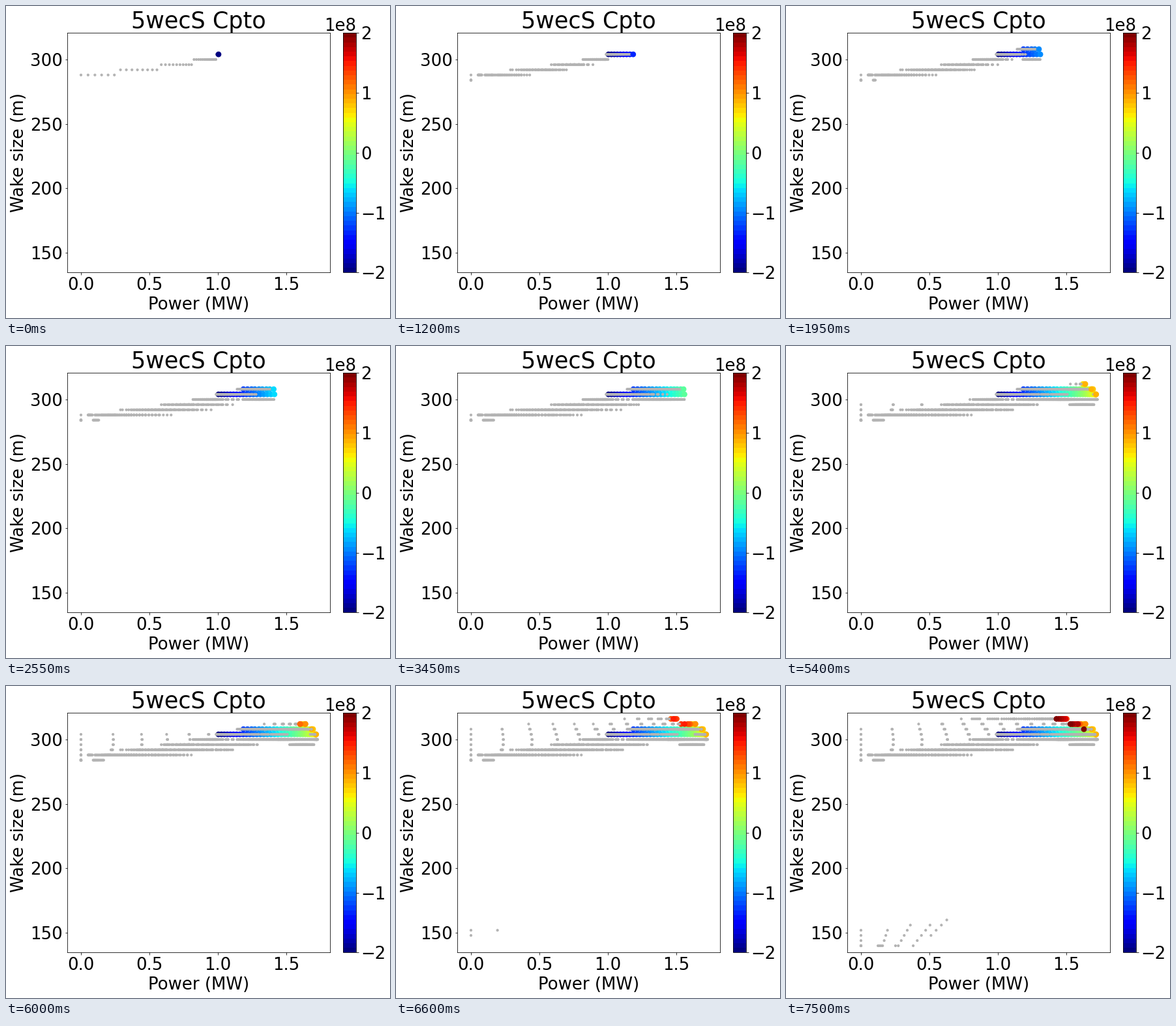
Recreate the animation shown at these times as a matplotlib script. Size 589 px wide and 478 px high, loop 7650 ms.

```python
import numpy as np
import matplotlib.pyplot as plt
from matplotlib.animation import FuncAnimation
from matplotlib.cm import ScalarMappable
from matplotlib.colors import Normalize

W, H, DPI = 589, 478, 72
STEPS, INTERVAL = 51, 150
GRAY = (0.7, 0.7, 0.7, 1)
JET = plt.get_cmap("jet", STEPS)
DAMPING = np.arange(STEPS)
RESONANCE, COLLAPSE = 36, 43
plt.rcParams["font.family"] = "DejaVu Sans"


def absorbed_power(k):
    """Spring-damper absorber: stiffness k cancels the reactance near resonance."""
    resistance = 15
    reactance = 44.5 - 1.5 * k + 0.008 * k**2
    impedance2 = 22.8**2 + reactance**2
    return 130.6 * DAMPING / (DAMPING**2 + 2 * resistance * DAMPING + impedance2)


def wake_size(k):
    """Wake relaxes from an undamped to a damped length, with a hump between."""
    undamped = 284.9 + 0.003 * max(20 - k, 0)**2 + min(0.045 * max(k - 20, 0)**2, 34.5)
    damped = 307 - 0.2 * k
    relaxed = undamped + (damped - undamped) * (1 - np.exp(-DAMPING / 28))
    center = max(30 - 0.46 * k, 10)
    height = min(k, 5 + k / 2, 15) - 0.02 * max(k - 28, 0)**2
    hump = height * np.exp(-((DAMPING - center) / (0.45 * center))**2)
    return np.minimum(4 * np.round((relaxed + hump) / 4), 316)


def sweep(k):
    """Power and wake size over all damping values at stiffness step k."""
    power, wake = absorbed_power(k), wake_size(k)
    # Weakly damped cases collapse to a short wake at high stiffness
    age = k - COLLAPSE - DAMPING
    collapsed = (DAMPING < 5) & (age >= 0)
    power = np.where(collapsed, power * (0.87 - 0.04 * age), power)
    short = np.maximum(152 + 4 * (DAMPING // 2) - 4 * age, 140)
    return power, np.where(collapsed, short, wake)


def pareto_front(k, power, wake):
    """Best power per wake size, kept where no longer wake gives more."""
    lowest = 312 if RESONANCE < k < STEPS - 1 else 304
    best = 0
    for level in np.unique(wake[wake >= lowest])[::-1]:
        top = power[wake == level].max()
        if top > best:
            best = top
            yield top, level


def build_points():
    xy, sizes, colors, born = [], [], [], []
    for k in range(STEPS):
        power, wake = sweep(k)
        cloud = list(zip(power, wake))
        front = list(pareto_front(k, power, wake))
        xy += cloud + front
        sizes += [10] * len(cloud) + [60] * len(front)
        colors += [GRAY] * len(cloud) + [JET(k)] * len(front)
        born += [k] * (len(cloud) + len(front))
    return [np.array(a) for a in (xy, sizes, colors, born)]


def add_axes(left, right, top=41.1, bottom=408.4):
    return fig.add_axes([left / W, 1 - bottom / H, (right - left) / W, (bottom - top) / H])


fig = plt.figure(figsize=(W / DPI, H / DPI), dpi=DPI, facecolor="white")
ax = add_axes(94.2, 497)
ax.set(xlim=(-0.099, 1.819), ylim=(134.7, 320.7),
       xticks=np.arange(0, 2, 0.5), yticks=np.arange(150, 301, 50))
ax.set_title("5wecS Cpto", fontsize=35)
ax.set_xlabel("Power (MW)", fontsize=26)
ax.set_ylabel("Wake size (m)", fontsize=26)
ax.tick_params(labelsize=26)

cax = add_axes(517.1, 537.2)
bar = fig.colorbar(ScalarMappable(Normalize(-2e8, 2e8), JET), cax=cax,
                   ticks=np.arange(-2, 3) * 1e8)
bar.ax.tick_params(labelsize=26)
bar.ax.yaxis.get_offset_text().set_fontsize(26)

points, sizes, colors, born = build_points()
dots = ax.scatter([], [], linewidths=1)


def update(k):
    shown = born <= k
    dots.set_offsets(points[shown])
    dots.set_sizes(sizes[shown], DPI)
    dots.set_facecolors(colors[shown])
    dots.set_edgecolors(colors[shown])
    return [dots]


anim = FuncAnimation(fig, update, frames=STEPS, interval=INTERVAL, repeat=True)
plt.show()
```
